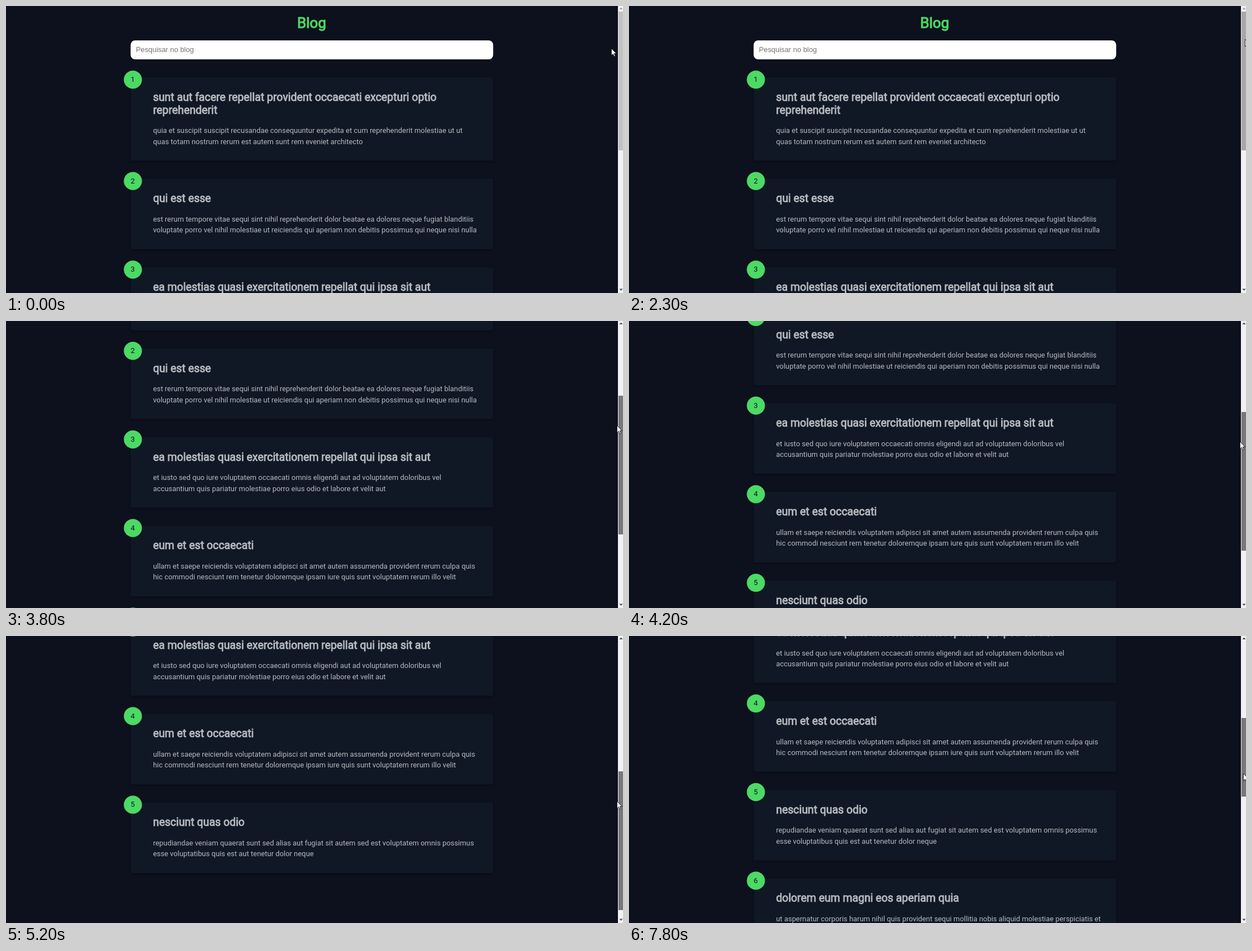
Write an HTML page that moves like this. It is 1096 by 511 pixels and loops after 8000 ms.

```html
<!DOCTYPE html>
<html lang="pt">
<head>
<meta charset="utf-8">
<title>Blog</title>
<style>
  * { margin: 0; padding: 0; box-sizing: border-box; }
  html, body { width: 100%; height: 100%; overflow: hidden; background: #0d101d; }
  #stage { position: relative; width: 1096px; height: 511px; overflow: hidden; }
  #page {
    position: absolute; left: 0; top: 0; width: 1349px; height: 1600px;
    transform-origin: 0 0; font: 16px/24px Roboto, sans-serif; color: #b7babe;
  }
  h1, h2 { font-weight: 400; -webkit-text-stroke: .045em currentColor; }
  h1 { position: absolute; top: 18px; width: 100%; font-size: 32px; line-height: 38px; text-align: center; color: #4cd964; }
  h2 { font-size: 24px; line-height: 28px; margin-bottom: 20px; }
  #search {
    position: absolute; left: 274.5px; top: 76px; width: 800px; height: 42px; padding: 12px;
    border-radius: 10px; background: #fff; color: #757575; font: 16px/18px "Liberation Sans", Arial, sans-serif;
  }
  #posts { position: absolute; left: 274.5px; top: 158px; width: 800px; }
  .card {
    position: relative; margin-bottom: 40px; padding: 30px 0 30px 50px; border-radius: 4px;
    background: #101826; box-shadow: 0 2px 4px rgba(0, 0, 0, .3); white-space: pre;
  }
  .badge {
    position: absolute; left: -15px; top: -15px; width: 40px; height: 40px; border-radius: 50%;
    background: #4cd964; color: #0d101d; line-height: 40px; text-align: center;
  }
  .dot { position: absolute; width: 8px; height: 8px; border-radius: 50%; background: #4cd964; }
  #bar { position: absolute; left: 1086.5px; top: 0; width: 10px; height: 511px; background: #f1f1f1; }
  #thumb { position: absolute; left: 1.5px; width: 9px; }
  svg { position: absolute; left: 0; top: 0; overflow: visible; }
</style>
</head>
<body>
<div id="stage">
  <div id="page">
    <h1>Blog</h1>
    <div id="search">Pesquisar no blog</div>
    <div id="posts"></div>
  </div>
  <div id="loader"></div>
  <div id="bar">
    <div id="thumb"></div>
    <svg width="10" height="511">
      <path id="up" d="M2.5 6h6l-3-3.4z"/>
      <path id="down" d="M2.5 503.6h6l-3 3.4z"/>
    </svg>
  </div>
  <svg id="cursor" width="12" height="19">
    <path transform="scale(.805)" d="M.5 .5V16.5L4.2 13 6.7 18.6 9.2 17.6 6.8 12H11.5Z" fill="#fff" stroke="#000"/>
  </svg>
</div>
<script>
const $ = id => document.getElementById(id);
const SCALE = .805, MAX_SCROLL = 507, LOADED = 6800;

const posts = [
  ["sunt aut facere repellat provident occaecati excepturi optio\nreprehenderit",
   "quia et suscipit suscipit recusandae consequuntur expedita et cum reprehenderit molestiae ut ut\nquas totam nostrum rerum est autem sunt rem eveniet architecto"],
  ["qui est esse",
   "est rerum tempore vitae sequi sint nihil reprehenderit dolor beatae ea dolores neque fugiat blanditiis\nvoluptate porro vel nihil molestiae ut reiciendis qui aperiam non debitis possimus qui neque nisi nulla"],
  ["ea molestias quasi exercitationem repellat qui ipsa sit aut",
   "et iusto sed quo iure voluptatem occaecati omnis eligendi aut ad voluptatem doloribus vel\naccusantium quis pariatur molestiae porro eius odio et labore et velit aut"],
  ["eum et est occaecati",
   "ullam et saepe reiciendis voluptatem adipisci sit amet autem assumenda provident rerum culpa quis\nhic commodi nesciunt rem tenetur doloremque ipsam iure quis sunt voluptatem rerum illo velit"],
  ["nesciunt quas odio",
   "repudiandae veniam quaerat sunt sed alias aut fugiat sit autem sed est voluptatem omnis possimus\nesse voluptatibus quis est aut tenetur dolor neque"],
  ["dolorem eum magni eos aperiam quia",
   "ut aspernatur corporis harum nihil quis provident sequi mollitia nobis aliquid molestiae perspiciatis et\n"]
];
$("posts").innerHTML = posts.map(([title, body], i) =>
  `<div class="card"><div class="badge">${i + 1}</div><h2>${title}</h2><p>${body}</p></div>`).join("");
const lastCard = $("posts").lastChild;

const dots = [0, 1, 2].map(i => {
  const dot = $("loader").appendChild(document.createElement("div"));
  dot.className = "dot";
  dot.style.left = 523 + i * 16.1 + "px";
  return dot;
});

const clamp = v => Math.max(0, Math.min(1, v));
const ramp = (t, from, to) => clamp((t - from) / (to - from));

function scrollAt(t) {
  return 60 * ramp(t, 3200, 3400) + 198.5 * ramp(t, 3500, 3800) + 120.5 * ramp(t, 3800, 4600)
    + 105.5 * ramp(t, 4600, 5200) + 22.5 * ramp(t, 5200, 5300);
}

// the pointer reaches the bar, drags the thumb down, drifts off and comes back up
function pointerAt(t, dragged) {
  const reach = ramp(t, 200, 600), settle = ramp(t, 1900, 2300), back = ramp(t, 6500, 6800);
  const drift = ramp(t, 5400, 5600) / 3 + ramp(t, 5700, 5900) * 2 / 3;
  return {
    x: 1075 + 17 * reach - 15 * Math.sin(Math.PI * ramp(t, 1000, 1600)) + 2 * settle
      - 9 * ramp(t, 3200, 3800) - 15 * drift + 21 * back,
    y: 75 - 13 * reach - 3 * settle + 3 * ramp(t, 3200, 3400) + dragged + 20 * ramp(t, 5200, 5300)
      + 60 * drift - 81 * back - 53 * ramp(t, 6900, 7500) - 6 * ramp(t, 7600, 7800)
  };
}

function thumbColor(t, { x, y }, top, height) {
  const click = t >= 2000 && t < 2200, drag = t >= 3300 && t < 6600;
  if (click || drag || t >= 7700) return "#787878";
  return x >= 1088 && y > top && y < top + height ? "#a8a8a8" : "#c1c1c1";
}

// ease-in up, ease-in down
function bounce(ms) {
  const p = (ms + 1000) % 500 / 250;
  return p < 1 ? p ** 1.68 : 1 - (p - 1) ** 1.68;
}

function drawLoader(t) {
  const held = Math.min(t % 300 ? t : t - 100, 6200); // every third step stands still
  $("loader").style.opacity = Math.min(ramp(held, 5400, 5700), 1 - ramp(t, 6500, LOADED));
  dots.forEach((dot, i) => {
    dot.style.top = 460 - 8 * bounce(held - 5375 - i * 100) + "px";
  });
}

function draw(t) {
  const scroll = scrollAt(t), loaded = t >= LOADED;
  const dragged = scroll * 242.5 / MAX_SCROLL;
  const top = loaded ? 146 : Math.floor(10 + dragged), height = loaded ? 140 : 247;
  const pointer = pointerAt(t, dragged);

  $("page").style.transform = `translateY(${-scroll}px) scale(${SCALE})`;
  lastCard.style.display = loaded ? "" : "none";
  $("cursor").style.transform = `translate(${pointer.x}px, ${pointer.y}px)`;
  $("thumb").style.top = top + "px";
  $("thumb").style.height = height + "px";
  $("thumb").style.background = thumbColor(t, pointer, top, height);
  const arrow = (id, enabled) => $(id).style.fill = enabled ? "#505050" : "#a3a3a3";
  arrow("up", scroll > 0);
  arrow("down", scroll < MAX_SCROLL || loaded);
  drawLoader(Math.max(t, 5400));
}

function tick() {
  draw(Math.floor(performance.now() % 8000 / 100) * 100);
  requestAnimationFrame(tick);
}
tick();
</script>
</body>
</html>
```
